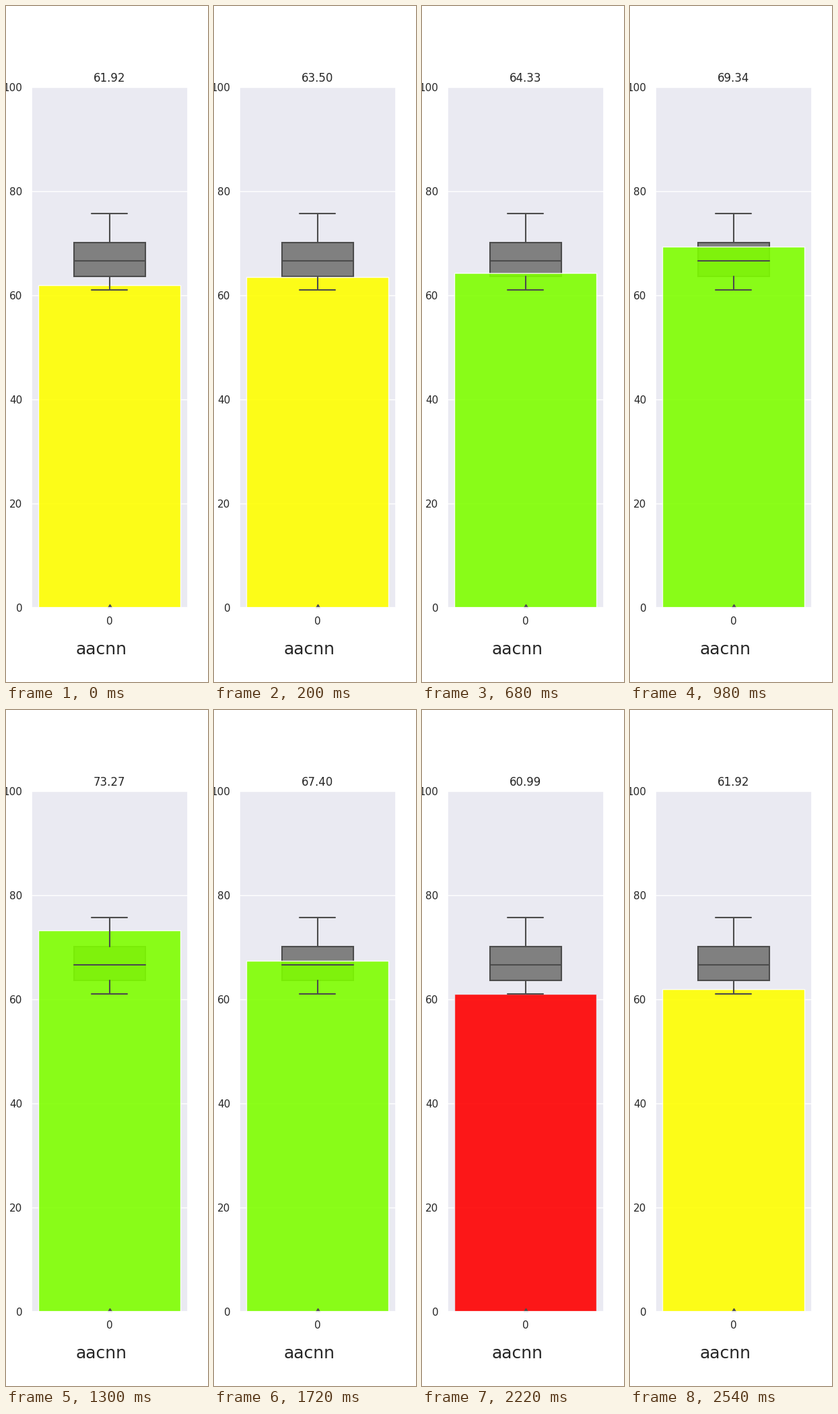
These frames come from a looping animation (300x1000 px, 2560 ms). A matplotlib script:

```python
import matplotlib.pyplot as plt
from matplotlib.animation import FuncAnimation

DPI = 100
INK = "0.15"
PANEL = "#EAEAF2"
OUTLINE = "#4c4c4c"

# Box statistics and the scores stepped through
LOW, Q1, MEDIAN, Q3, HIGH = 60.99, 63.62, 66.62, 70.15, 75.72
SCORES = [
    61.92, 62.38, 62.71, 63.75, 62.10, 63.05, 63.50, 62.64,
    60.99, 64.02, 65.44, 64.80, 65.90, 64.33, 66.21, 65.12,
    66.58, 67.25, 64.33, 66.66, 68.03, 67.40, 69.10, 68.55,
    70.42, 69.34, 71.20, 72.05, 70.80, 74.10, 73.27, 75.72,
]

# Every fourth score is held five ticks; the sequence then runs backwards
forward = [s for i, s in enumerate(SCORES) for _ in range(5 if i % 4 == 2 else 1)]
timeline = forward + forward[::-1]

plt.rcParams["font.family"] = "DejaVu Sans"
fig = plt.figure(figsize=(3, 10), dpi=DPI, facecolor="white")
ax = fig.add_axes([0.125, 0.11, 0.775, 0.77], facecolor=PANEL)
ax.set(xlim=(-0.44, 0.44), ylim=(0, 100), xticks=[0], yticks=range(0, 101, 20))
ax.set_axisbelow(True)
ax.grid(axis="y", color="white", linewidth=1)
ax.tick_params(length=6, pad=3.5, left=False, bottom=False,
               labelsize=11, labelcolor=INK)
for spine in ax.spines.values():
    spine.set(color="white", linewidth=1.25)


def stroke(xs, ys):
    ax.plot(xs, ys, color=OUTLINE, linewidth=1.5, solid_capstyle="round")


def draw_box():
    ax.add_patch(plt.Rectangle((-0.2, Q1), 0.4, Q3 - Q1, facecolor="#808080",
                               edgecolor=OUTLINE, linewidth=1.5))
    for start, end in ((Q1, LOW), (Q3, HIGH)):
        stroke([0, 0], [start, end])
        stroke([-0.1, 0.1], [end, end])
    stroke([-0.2, 0.2], [MEDIAN, MEDIAN])
    ax.plot([0], [0], linestyle="none", marker="d", markersize=5,
            color=OUTLINE)


def bar_colors(score):
    if score <= LOW:
        return "red", PANEL
    return ("yellow" if score < Q1 else "chartreuse"), "white"


draw_box()
bar = ax.bar([0], [SCORES[0]], width=0.8, alpha=0.9, linewidth=1)[0]
ax.set(xlim=(-0.44, 0.44), ylim=(0, 100))
title = ax.set_title("", fontsize=12, color=INK, pad=6)
fig.text(141.5 / 300, 1 - 959 / 1000, "aacnn", fontsize=18, color=INK,
         ha="center", va="baseline")


def update(tick):
    score = timeline[tick]
    face, edge = bar_colors(score)
    bar.set(height=score, facecolor=face, edgecolor=edge)
    title.set_text(f"{score:.2f}")
    return bar, title


anim = FuncAnimation(fig, update, frames=len(timeline), interval=20,
                     repeat=True, repeat_delay=0, blit=False)
plt.show()
```
